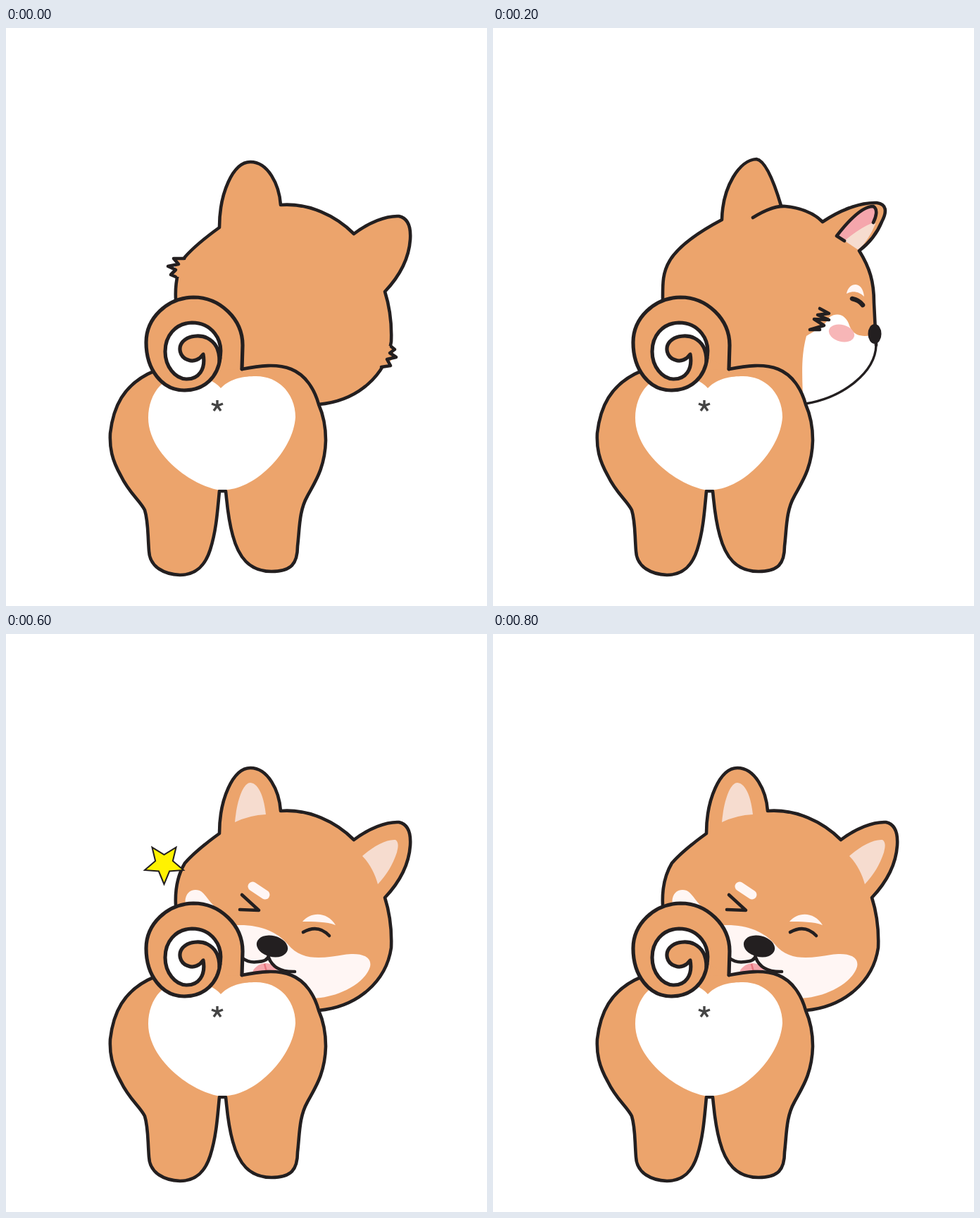
Animation of 683 by 820 pixels, one loop 0.9 s. Source, as an HTML page:

```html
<!DOCTYPE html>
<html lang="en">
<head>
<meta charset="utf-8">
<title>Shiba wink</title>
<style>
  html, body { margin: 0; width: 100%; height: 100%; overflow: hidden; background: #fff; }
  svg { display: block; width: 100%; height: 100%; }
  .fur { fill: #eca46c; }
  .ink { stroke: #231f20; stroke-width: 4.6; stroke-linejoin: round; stroke-linecap: round; }
  .bold { stroke-width: 5.2; }
  .line { fill: none; }
  .black { fill: #231f20; }
  .white { fill: #fff; }
  .pale { fill: #fff6f4; }
  .cream { fill: #f6dccf; }
  .pink { fill: #f5a6ac; }
  .blush { fill: #f7b6b7; }
</style>
</head>
<body>
<svg viewBox="0 0 683 820">
  <g id="front">
    <path class="fur ink" d="M303 283C303 235 322 190 347 190C372 190 388 222 390 251C430 248 468 266 494 292C515 276 540 266 558 267C572 270 575 285 574 300C572 330 556 355 538 374C545 396 548 420 547 445C540 493 499 529 444 534H300L241 385C240 365 242 345 254 325C268 309 285 296 303 283Z"/>
    <g id="tufts">
      <path class="fur" d="M258 329H243L238 345L239 353H252ZM540 451H550V468L537 482H528Z"/>
      <path class="ink line" d="M253 327H238L245 335L230 338L241 343L234 350L241 353"/>
      <path class="ink line" d="M547 452L552 456L545 461L554 467L541 470L546 479L533 481"/>
    </g>
    <g id="face">
      <path class="cream" d="M325 267C328 235 337 211 347 211C360 212 367 235 369 256Q346 257 325 267Z"/>
      <path class="cream" d="M506 315C522 301 540 291 553 292C559 296 556 305 555 310C549 328 540 342 528 355C524 340 516 325 506 315Z"/>
      <path class="pale" d="M255 385C252 367 264 360 275 364C283 368 288 380 298 388Z"/>
      <path d="M350 358L368 370" fill="none" stroke="#fff6f4" stroke-width="13" stroke-linecap="round"/>
      <path class="pale" d="M421 408C432 394 456 393 468 413C455 408 438 408 421 408Z"/>
      <path class="pale" d="M328 413C360 412 385 422 400 440C420 465 450 460 480 455C505 451 520 458 517 472C510 495 475 515 436 517L335 490Z"/>
      <path class="pink" d="M351 477C360 464 378 463 385 478L381 484H350Z"/>
      <path id="tongueLine" d="M367 468L370 479" fill="none" stroke="#e8747f" stroke-width="2.5"/>
      <ellipse class="black" rx="22.5" ry="15" transform="translate(378 443) rotate(14)"/>
      <path class="ink line" d="M336 460Q345 467 358 465Q372 464 373 456M373 459Q381 480 410 479"/>
      <path id="smileEye" class="ink line" d="M327 386Q346 372 362 395"/>
      <path id="winkEye" class="ink line" d="M335 370L359 392L332 391"/>
      <path class="ink line" d="M422 423Q443 411 459 428"/>
    </g>
  </g>

  <g id="turning">
    <path class="fur" d="M316 277C320 225 345 186 368 185C390 187 392 225 399 250L412 251C440 252 470 266 489 288C510 274 535 263 555 265C570 268 570 282 565 297C558 320 548 342 535 358C543 385 548 410 547 440C545 490 510 520 445 536H300L241 388C241 365 240 348 251 331C262 313 290 294 316 277Z"/>
    <path class="white" d="M444 537C446 510 450 490 475 487C500 485 520 478 530 465L546 452C544 490 510 520 444 537Z"/>
    <path class="cream" d="M513 331C530 305 550 284 565 279L565 297C558 320 548 342 535 358Q526 340 513 331Z"/>
    <path class="pink" d="M514 330C530 305 550 285 563 281L558 302Q534 311 514 330Z"/>
    <path class="ink line" d="M513 331C525 312 550 282 563 281Q560 291 557 303"/>
    <path class="ink line" d="M359 268C380 255 398 249 412 251C440 252 470 266 489 288C510 274 535 263 555 265C570 268 570 282 565 297C558 320 548 342 535 358C543 385 548 410 547 440"/>
    <path class="line" stroke="#231f20" stroke-width="3" d="M546 445C544 490 510 520 444 536"/>
    <path class="ink line" d="M241 388C241 365 240 348 251 331C262 313 290 294 316 277C320 225 345 186 368 185C390 187 392 225 399 250"/>
    <path class="ink line" d="M545 434L538 438L547 441L532 445L546 450L526 453L539 459L522 464H532"/>
  </g>

  <g id="side">
    <path class="fur" d="M325 272C326 225 350 187 374 186C388 188 401 225 409 252C435 254 455 262 468 275C490 260 520 247 545 248C560 250 559 262 552 275C545 292 533 306 520 316C535 340 541 360 541 390L544 450C543 488 498 524 444 533H300L241 388C241 365 240 348 251 330C263 310 291 290 325 272Z"/>
    <path class="white" d="M440 534C440 500 436 470 445 437C455 430 470 425 478 410C490 402 502 408 506 422C512 438 525 438 538 436L544 450C543 488 498 524 440 534Z"/>
    <path class="cream" d="M498 301L540 272L543 278Q534 300 519 315Z"/>
    <path class="pink" d="M488 295C505 273 525 253 540 253C547 257 544 268 540 276Q520 284 499 302Z"/>
    <path class="ink line" d="M499 302L488 295C505 273 525 253 540 253C547 257 544 268 540 276"/>
    <path class="ink line" d="M369 269C385 259 400 252 415 253C435 255 455 262 468 275C490 260 520 247 545 248C560 250 559 262 552 275C545 292 533 306 520 316C535 340 541 360 541 390L544 450"/>
    <path class="line" stroke="#231f20" stroke-width="3.4" d="M544 450C543 488 498 524 444 533"/>
    <path class="ink line" d="M241 388C241 365 240 348 251 330C263 310 291 290 325 272C326 225 350 187 374 186C388 188 401 225 409 252"/>
    <path class="pale" d="M502 377C505 360 525 358 527 381C518 373 510 373 502 377Z"/>
    <path class="ink line" style="stroke-width:6.5" d="M510 384Q520 386 525 393"/>
    <ellipse class="blush" rx="18.5" ry="12" transform="translate(495 433) rotate(15)"/>
    <ellipse class="black" cx="542" cy="434" rx="9.5" ry="14"/>
    <path class="ink line" d="M464 398L477 405L461 407L477 414L456 413L470 422L450 428H464"/>
  </g>

  <path class="fur ink" d="M335 484C360 479 385 476 405 484C425 492 438 512 444 534C452 552 454 568 454 585C453 625 438 645 428 664C416 685 417 710 414 735C414 760 405 771 377 771C345 771 330 750 322 720C315 695 314 675 312 657H303C300 690 298 715 290 740C282 765 268 776 247 776C225 775 204 765 203 742C201 715 202 700 197 684C190 670 175 660 163 635C150 612 147 595 148 575C152 540 165 505 212 486"/>
  <path class="white" d="M305 511C318 497 338 494 355 494C390 494 411 522 411 552C408 600 355 653 313 655H300C255 645 202 600 202 553C202 530 212 510 228 500H290Q299 504 305 511Z"/>
  <path d="M300 536V528M300 536L308 533M300 536L305 543M300 536L295 543M300 536L292 533" stroke="#444" stroke-width="3.4"/>

  <path class="fur ink bold" d="M335 484L336 450C336 413 304 382 266 382C228 383 199 412 199 446C199 485 222 514 253 514C282 514 301 495 304 468"/>
  <path class="white ink bold" d="M303 472C311 440 290 418 264 418C240 419 226 437 226 459C226 480 240 498 257 498C273 498 284 485 280 463C275 470 267 474 259 471C246 467 244 453 251 445C259 436 276 435 286 440C298 446 303 458 303 472Z"/>

  <path id="star" fill="#fff200" stroke="#231f20" stroke-width="2"/>
</svg>
<script>
  const LOOP = 900, STEP = 100;
  const part = id => document.getElementById(id);
  const show = (id, visible) => part(id).style.display = visible ? "" : "none";

  // Five-pointed star standing on one tip.
  const corners = Array.from({ length: 10 }, (_, i) => {
    const angle = Math.PI / 2 + i * Math.PI / 5, radius = i % 2 ? 13 : 29;
    return [radius * Math.cos(angle), radius * Math.sin(angle)];
  });
  part("star").setAttribute("d", "M" + corners.join("L") + "Z");

  function draw(now) {
    const step = Math.floor(now % LOOP / STEP);
    const winking = step >= 4, flight = step - 6;
    show("turning", step === 1);
    show("side", step === 2);
    show("front", step === 0 || step > 2);
    show("tufts", step === 0);
    show("face", step > 2);
    show("smileEye", !winking);
    show("winkEye", winking);
    show("tongueLine", winking);
    show("star", Math.abs(flight) <= 1);
    part("star").setAttribute("transform", `translate(${224.5 - 37 * flight} ${326 - 25 * flight})`);
  }

  const start = performance.now();
  function tick() {
    draw(performance.now() - start);
    requestAnimationFrame(tick);
  }
  tick();
</script>
</body>
</html>
```
